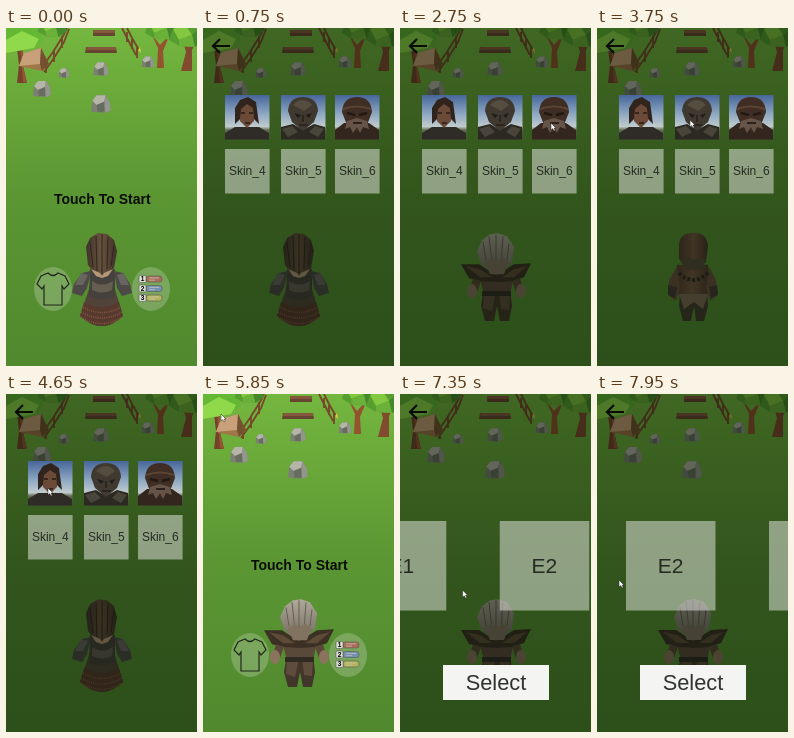
Recreate the animation shown at these times as an HTML page. Size 191 px wide and 338 px high, loop 8000 ms.

```html
<!DOCTYPE html>
<html lang="en">
<head>
<meta charset="utf-8">
<title>Character and level menu</title>
<style>
html,body{margin:0;width:100%;height:100%;overflow:hidden;background:#56982e}
svg{display:block;width:100vw;height:100vh}
text{font-family:"Liberation Sans",Arial,sans-serif;text-anchor:middle}
</style>
</head>
<body>
<svg id="stage" viewBox="0 0 191 338" preserveAspectRatio="none">
<defs>
  <linearGradient id="grass" x2="0" y2="1"><stop stop-color="#74b73f"/><stop offset=".25" stop-color="#67a638"/><stop offset=".5" stop-color="#5b9633"/><stop offset="1" stop-color="#50892e"/></linearGradient>
  <linearGradient id="sky" x2="0" y2="1"><stop stop-color="#46669a"/><stop offset=".45" stop-color="#93abc4"/><stop offset=".7" stop-color="#c0cbcd"/><stop offset=".78" stop-color="#606b50"/><stop offset="1" stop-color="#434b34"/></linearGradient>
  <linearGradient id="hair" x2="1"><stop stop-color="#403329"/><stop offset=".5" stop-color="#68523f"/><stop offset="1" stop-color="#3d3027"/></linearGradient>
  <linearGradient id="silver" x2="0" y2="1"><stop stop-color="#b0aa9a"/><stop offset="1" stop-color="#777064"/></linearGradient>
  <linearGradient id="skin" x2="1"><stop stop-color="#513a2c"/><stop offset=".5" stop-color="#765742"/><stop offset="1" stop-color="#473327"/></linearGradient>
  <clipPath id="frame"><path d="M0 0H44.5V44.5H0Z"/></clipPath>
  <g id="rock">
    <path d="M-9 7L-8-3L-4-8L4-8L8-2L9 6L3 8Z" fill="#7b8073"/>
    <path d="M-8-3L-4-8L4-8L3-2L-4 1Z" fill="#b5b5a8"/>
    <path d="M3-2L4-8L8-2L9 6L4 8Z" fill="#93968a"/>
    <path d="M-4 1L3-2L3 7L-3 7Z" fill="#676c60"/>
  </g>
  <g id="bush">
    <path d="M-18 3L-14-8L-2-13L13-9L19 2L8 10L-8 9Z" fill="#569e2f"/>
    <path d="M-14-8L-2-13L5-2L-8 3Z" fill="#83c83f"/>
    <path d="M5-2L13-9L19 2L8 10Z" fill="#438929"/>
    <path d="M-8 3L5-2L8 10L-8 9Z" fill="#6bb038"/>
  </g>
</defs>

<path d="M0 0H191V338H0Z" fill="url(#grass)"/>
<g id="scene">
  <g fill="none" stroke="#75462a" stroke-width="1.8">
    <path d="M38 44L48 30L58 14L63 1M37 38L47 24L57 8L61 0M40 35V45M48 23V34M56 8V20"/>
    <path d="M116 0L121 10L130 27M121 0L126 10L133 22M121 4V14M126 11V21M131 19V30"/>
  </g>
  <path d="M87 2H109V8H87ZM80 19H110L111 25H79Z" fill="#65452f"/>
  <path d="M87 2H109V5H87ZM81 19H110V22H80Z" fill="#85583d"/>
  <path d="M11 20L17 19L17 38L21 55L11 55L13 37Z" fill="#74412a"/>
  <path d="M14 20L17 19L17 38L21 55L17 54Z" fill="#955535"/>
  <path d="M18 25L35 20L43 36L36 43L13 38Z" fill="#a07548"/>
  <path d="M18 25L35 20L34 36L13 38Z" fill="#c8a079"/>
  <path d="M34 36L35 20L43 36L36 43Z" fill="#74512f"/>
  <path d="M145 5L152 20L151 40H158L157 23L164 6L154 17Z" fill="#94522f"/>
  <path d="M176 10L180 24L175 43H186L186 22L191 12V8L183 19Z" fill="#824a2e"/>
  <path d="M0 0H33L38 11L28 20L0 25Z" fill="#64b834"/>
  <path d="M0 12L16 3L33 11L28 20L0 25Z" fill="#90d94a"/>
  <use href="#bush" transform="translate(46 1) scale(.8)"/>
  <use href="#bush" transform="translate(156 2) scale(.95)"/>
  <use href="#bush" transform="translate(181 9)"/>
  <use href="#rock" transform="translate(36 61)"/>
  <use href="#rock" transform="translate(58 45) scale(.6)"/>
  <use href="#rock" transform="translate(142 34) scale(.7)"/>
  <use href="#rock" transform="translate(95 41) scale(.85)"/>
  <use href="#rock" transform="translate(95 76) scale(1.1)"/>
  <path d="M132 22L134 19L135 25Z" fill="#e3c84c"/>
</g>

<g id="hero">
  <g data-skin="4">
    <path d="M84 258H108L117 288Q96 308 74 288Z" fill="#51433a"/>
    <path d="M78 274Q96 284 113 274L117 288Q96 308 74 288Z" fill="#58392d"/>
    <path d="M77 279Q96 290 115 279M75 284Q96 296 116 284M75 289Q96 302 116 289" fill="none" stroke="#855746" stroke-width="1.6" stroke-dasharray="1 1.2"/>
    <path d="M84 241H109L109 268Q96 275 83 268Z" fill="#45413c"/>
    <path d="M85 243L76 245L68 256L66 265L76 268L81 260ZM108 243L117 245L124 256L126 265L116 268L111 260Z" fill="#4c4946"/>
    <path d="M75 245L82 247L77 257L69 257ZM118 245L111 247L115 257L123 257Z" fill="#68645f"/>
    <path d="M82 237L80 219L84 210L92 205L101 206L108 212L111 223L108 240L101 249H91Z" fill="url(#hair)"/>
    <path d="M84 214L87 239M90 208L91 243M96 206V246M102 209L101 241M108 217L105 238" stroke="#30271f" fill="none"/>
    <path d="M85 241L94 245L96 248L98 245L107 241L102 248L96 250L90 248Z" fill="#b59878"/>
    <path d="M86 253Q96 260 107 253L106 262Q96 267 86 262Z" fill="#655c52"/>
  </g>
  <g data-skin="5">
    <path d="M84 260H110L112 278L109 293H100L97 278L94 293H85L81 278Z" fill="#423529"/>
    <path d="M84 264H96L92 283L83 280ZM99 264H110L109 282L101 281Z" fill="#5e4d3c"/>
    <path d="M78 242H115L110 267H84Z" fill="#594939"/>
    <path d="M61 236L79 236L96 247L114 236L131 235L124 249L112 253L97 254L81 253L69 250Z" fill="#3c3025"/>
    <path d="M66 238L80 241L92 249L80 249ZM127 238L114 241L102 249L114 249Z" fill="#5d4b37"/>
    <path d="M73 250L81 253L77 264H69ZM120 250L112 253L116 264H124Z" fill="#5a4737"/>
    <ellipse cx="72" cy="263" rx="5" ry="7" fill="#8b745d"/><ellipse cx="121" cy="263" rx="5" ry="7" fill="#8b745d"/>
    <path d="M81 235L77 223L82 212L90 206L98 205L107 208L114 219L112 234L106 241H87Z" fill="url(#silver)"/>
    <path d="M83 213L86 232M89 208L92 236M96 206V238M103 208L101 236M109 215L107 232" stroke="#656054" fill="none"/>
    <path d="M85 234L92 229L96 234L102 229L108 234L104 246H90Z" fill="#817360"/>
    <path d="M82 263H111V268H82Z" fill="#302a23"/>
  </g>
  <g data-skin="6">
    <path d="M83 263H110L111 278L107 293H99L97 278L94 293H86L82 278Z" fill="#433a2c"/>
    <path d="M80 237H111L114 260L108 270H84L77 260Z" fill="url(#skin)"/>
    <path d="M80 239L72 252L71 267L79 273L83 260ZM112 239L119 252L121 267L113 273L109 260Z" fill="#69503f"/>
    <path d="M71 257L80 259L78 270L71 267ZM112 259L120 257L121 267L114 270Z" fill="#423a34"/>
    <path d="M82 231V217Q83 205 96 205Q110 205 111 218L109 234L102 242H90Z" fill="url(#skin)"/>
    <path d="M84 232L91 229L97 232L104 229L109 232L103 242H90Z" fill="#56483b"/>
    <path d="M82 245Q96 259 111 245" fill="none" stroke="#322a24" stroke-width="4" stroke-dasharray="3 2"/>
    <path d="M82 266H111L106 281L97 274L87 281Z" fill="#7f6955"/>
  </g>
</g>
<path id="shade" d="M0 0H191V338H0Z" fill="#071006" opacity=".48"/>

<g id="home">
  <text x="96.3" y="176.3" font-size="14" font-weight="700" fill="#0a0d07">Touch To Start</text>
  <g fill="#e4e9dc" fill-opacity=".26"><ellipse cx="47" cy="261" rx="19" ry="22"/><ellipse cx="145" cy="261" rx="19" ry="22"/></g>
  <path d="M42 245Q47 250 52 245L59 248L63 256L58 261L56 258V277H38V258L36 261L31 256L35 248Z" fill="none" stroke="#20291b" stroke-width="1.2"/>
  <g id="bars"></g>
</g>
<g id="skins"></g>
<g id="levels">
  <g id="cards"></g>
  <path d="M43 271H149V306H43Z" fill="#f4f4f2"/>
  <text x="96" y="296" font-size="21.8" fill="#30332f">Select</text>
</g>
<path id="back" d="M27 18H10M17 11L10 18L17 25" fill="none" stroke="#080b07" stroke-width="2.2"/>
<path id="cursor" d="M0 0V7L1.7 5.6L3 8L4.2 7.3L3 5H5Z" fill="#fff" stroke="#222" stroke-width=".5"/>
</svg>
<script>
const $ = id => document.getElementById(id);
const show = (el, on) => el.style.display = on ? "" : "none";

const faces = {
  4: `<path d="M0 38L10 32L34 32L44 38V45H0Z" fill="#2f2b26"/><path d="M14 12Q22 5 30 12L29 26L22 33L15 26Z" fill="#6b4a38"/>
      <path d="M10 29L10 13L15 5L23 2L31 7L34 29L29 24L28 13L22 9L16 14L15 24Z" fill="#30241d"/>
      <path d="M16 18H20M24 18H28M20 28H25" stroke="#2a1d16" stroke-width="1.5"/>`,
  5: `<path d="M0 32L12 29L22 35L33 29L44 32V45H0Z" fill="#2c2922"/><path d="M1 34L11 31L17 37L7 42ZM43 34L34 31L28 37L37 42Z" fill="#4a453a"/>
      <path d="M7 16Q8 2 22 2Q36 2 37 16L33 27L22 36L11 27Z" fill="#3f392f"/><path d="M12 10Q22 0 31 10L23 16Z" fill="#554d40"/>
      <path d="M13 18L20 20L17 23ZM25 20L31 18L28 23Z" fill="#1f1d18"/><path d="M22 20V27M18 30H27" stroke="#262119" stroke-width="1.5"/>`,
  6: `<path d="M0 35L9 28L34 28L44 35V45H0Z" fill="#33261e"/><path d="M7 17Q8 2 22 2Q36 2 37 17L32 30L22 36L12 30Z" fill="#402d23"/>
      <path d="M8 14Q22 9 36 14" fill="none" stroke="#5c4536" stroke-width="2"/><path d="M12 18L20 20M24 20L32 18" stroke="#1f1813" stroke-width="2.5"/>
      <path d="M12 26L22 23L32 26L34 34L28 32L25 38L22 32L18 38L15 32L10 34Z" fill="#655447"/><path d="M18 28H27" stroke="#2b211a" stroke-width="2"/>`
};

$("skins").innerHTML = [[4, 22], [5, 78], [6, 132]].map(([n, x]) => `
  <g transform="translate(${x} 67)"><g clip-path="url(#frame)"><path d="M0 0H45V45H0Z" fill="url(#sky)"/>${faces[n]}</g>
  <path d="M0 54H44.6V98.4H0Z" fill="#e7eae3" opacity=".51"/>
  <text x="22.3" y="80.3" font-size="12" fill="#252b23">Skin_${n}</text></g>`).join("");

$("cards").innerHTML = [1, 2, 3].map((n, i) => `
  <g transform="translate(${51 + i * 143} 127)"><path d="M0 0H89.5V89.5H0Z" fill="#e7eae3" opacity=".51"/>
  <text x="44.5" y="52" font-size="21" fill="#252b23">E${n}</text></g>`).join("");

$("bars").innerHTML = ["#aa6c59", "#7490b3", "#b5b35c"].map((color, i) => `
  <g transform="translate(133 ${247.5 + i * 9.5})"><rect x="7" y=".5" width="16" height="6" rx="2.5" fill="${color}" stroke="#555d4d" stroke-width=".6"/>
  <rect width="7" height="7" rx="1" fill="#dcded5" stroke="#454b42" stroke-width=".5"/>
  <text x="3.6" y="5.9" font-size="6.5" font-weight="700">${i + 1}</text>
  <path d="M10 2.4H20M10 4.7H16" stroke="#d0c9ba" stroke-width=".7"/></g>`).join("");

const screens = [[0, "home"], [500, "skins"], [5750, "home"], [6400, "levels"]];
const outfits = [[0, "4"], [1350, "5"], [2900, "6"], [4350, "4"], [5100, "5"]];
const pointer = [[1950, 104, 98], [2700, 151, 95], [3300, 151, 95], [3750, 93, 92], [4250, 42, 94],
  [4750, 42, 94], [5050, 100, 95], [5150, 100, 95], [5600, 18, 20], [5880, 18, 20],
  [6300, 145, 262], [6420, 145, 262], [6720, 138, 215], [6900, 138, 215], [7650, 22, 186], [8000, 22, 186]];
const scroll = [[6900, 0], [7650, -145], [7900, -165]];

const at = (steps, t) => steps.filter(s => s[0] <= t).pop()[1];
function tween(steps, t) {
  const next = steps.findIndex(s => s[0] > t);
  if (next < 0) return steps.at(-1).slice(1);
  if (!next) return steps[0].slice(1);
  const a = steps[next - 1], b = steps[next];
  const p = (t - a[0]) / (b[0] - a[0]), ease = p * p * (3 - 2 * p);
  return a.slice(1).map((v, i) => v + (b[i + 1] - v) * ease);
}

function draw(t) {
  const screen = at(screens, t), outfit = at(outfits, t);
  for (const id of ["home", "skins", "levels"]) show($(id), id === screen);
  for (const id of ["shade", "back"]) show($(id), screen !== "home");
  for (const el of $("hero").children) show(el, el.dataset.skin === outfit);
  const breath = Math.sin(t / 1600 * Math.PI * 2);
  $("hero").setAttribute("transform", `translate(0 ${(-1.4 * breath).toFixed(2)}) scale(1 ${1 + .005 * breath})`);
  $("cards").setAttribute("transform", `translate(${tween(scroll, t)[0]} 0)`);
  show($("cursor"), t >= 1950);
  $("cursor").setAttribute("transform", `translate(${tween(pointer, t).join(" ")})`);
}

const start = performance.now();
function tick() {
  draw((performance.now() - start) % 8000);
  requestAnimationFrame(tick);
}
tick();
</script>
</body>
</html>
```
